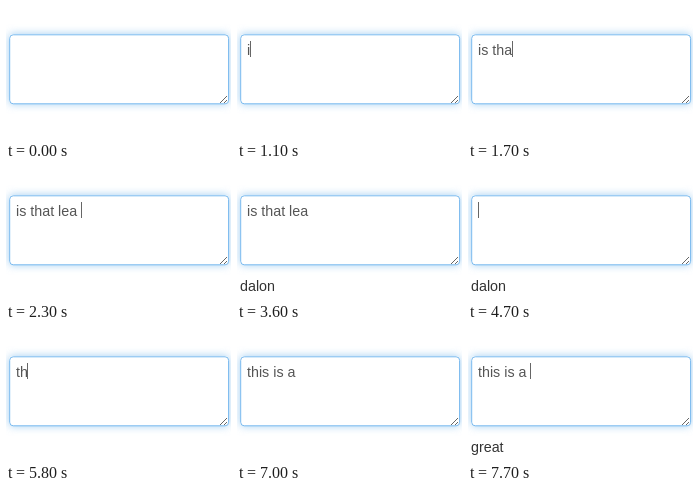
An HTML page for the animation above (8000 ms loop, 225 by 133 pixels).

```html
<!DOCTYPE html>
<html lang="en">
<head>
<meta charset="utf-8">
<title>Next word prediction</title>
<style>
  html, body { margin: 0; width: 100%; height: 100%; overflow: hidden; background: #fff; }
  body {
    position: relative;
    font: 14.3px/17px "Liberation Sans", Arial, Helvetica, sans-serif;
  }
  .glow {
    position: absolute; left: 3px; top: 28px; width: 220px; height: 70px;
    border-radius: 4px; background: #fff;
    box-shadow: 0 0 8px rgba(102, 175, 233, .6);
  }
  .frame { position: absolute; left: 0; top: 0; fill: none; }
  .text, .word { position: absolute; height: 17px; white-space: pre; }
  .text { left: 10px; top: 35px; line-height: 19px; color: #555; }
  .text.selected { background: #b3d7fe; }
  .word { left: 3px; top: 111px; color: #333; }
  .caret {
    position: absolute; left: 10px; top: 35px; width: 1px; height: 16px;
    background: #666;
  }
</style>
</head>
<body>
<div class="glow"></div>
<svg class="frame" width="225" height="133">
  <rect x="3.7" y="28.8" width="218.9" height="69" rx="3.5" stroke="#74b7ee"/>
  <path d="M214 97 L221 90 M218 97 L221 94" stroke="#666"/>
</svg>
<div class="text"></div>
<div class="caret"></div>
<div class="word"></div>
<script>
  const LOOP = 8000;
  const [text, caret, word] = ["text", "caret", "word"].map(c => document.querySelector("." + c));

  // [time in ms, typed text]
  const typing = [
    [0, ""], [1100, "i"], [1200, "is"], [1300, "is "],
    [1500, "is t"], [1600, "is th"], [1700, "is tha"], [1800, "is that"],
    [1900, "is that l"], [2100, "is that lea"], [2300, "is that lea "],
    [4700, ""], [5800, "th"], [5900, "thi"], [6000, "this"], [6100, "this "],
    [6200, "this i"], [6300, "this is"], [6400, "this is a"], [6600, "this is a "]
  ];
  const carets = [
    [0, false], [500, true], [1000, false], [1100, true], [3600, false],
    [4700, true], [5600, false], [5800, true], [7000, false], [7300, true]
  ];
  const selection = [[0, false], [4100, true], [4700, false]];
  const words = [[0, ""], [3100, "dalon"], [5200, ""], [7700, "great"]];

  const at = (steps, t) => steps.findLast(([start]) => start <= t)[1];

  function draw(t) {
    text.textContent = at(typing, t);
    text.classList.toggle("selected", at(selection, t));
    word.textContent = at(words, t);
    caret.style.left = Math.floor(10 + text.getBoundingClientRect().width) + "px";
    caret.style.visibility = at(carets, t) ? "visible" : "hidden";
  }

  const begin = performance.now();
  function tick() {
    draw((performance.now() - begin) % LOOP);
    requestAnimationFrame(tick);
  }
  tick();
</script>
</body>
</html>
```
